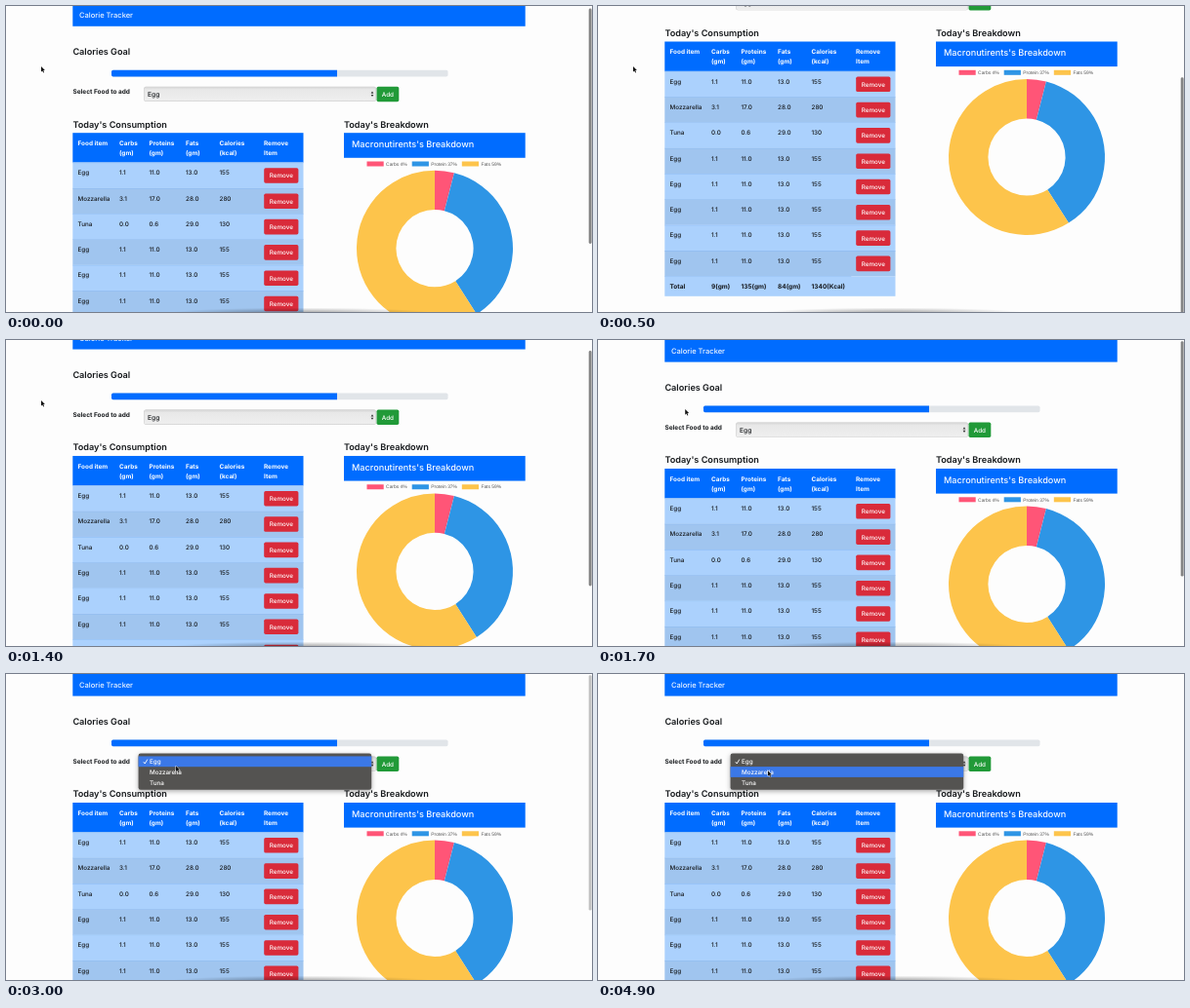
An HTML page with a canvas for the animation above (5000 ms loop, 600 px wide and 314 px high).

```html
<!DOCTYPE html>
<html lang="en">
<head>
<meta charset="utf-8">
<title>Calorie Tracker</title>
<style>
  html, body { margin: 0; width: 100%; height: 100%; overflow: hidden; background: #fdfdfd; }
  canvas { display: block; width: 600px; height: 314px; }
</style>
</head>
<body>
<canvas id="stage"></canvas>
<script>
const W = 600, H = 314, LOOP = 5000, STEP = 100, MAX_SCROLL = 95.5;
const BLUE = '#006cff', INK = '#16191c';
const canvas = document.getElementById('stage');
const ctx = canvas.getContext('2d');
const ratio = window.devicePixelRatio || 1;
canvas.width = W * ratio;
canvas.height = H * ratio;

const COLS = [73.5, 116, 146.5, 184, 218.5, 264];
const HEAD = [['Food item'], ['Carbs', '(gm)'], ['Proteins', '(gm)'],
  ['Fats', '(gm)'], ['Calories', '(kcal)'], ['Remove', 'Item']];
const EGG = ['Egg', '1.1', '11.0', '13.0', '155'];
const ROWS = [EGG, ['Mozzarella', '3.1', '17.0', '28.0', '280'],
  ['Tuna', '0.0', '0.6', '29.0', '130'], EGG, EGG, EGG, EGG, EGG];
const TOTAL = ['Total', '9(gm)', '135(gm)', '84(gm)', '1340(Kcal)'];
const SLICES = [
  { label: 'Carbs 4%', part: 0.04, color: '#ff5577', x: 369.5 },
  { label: 'Protein 37%', part: 0.37, color: '#2e95e5', x: 415.7 },
  { label: 'Fats 59%', part: 0.59, color: '#fdc44b', x: 466.8 }
];
const FOODS = ['Egg', 'Mozzarella', 'Tuna'];

const clamp = v => Math.max(0, Math.min(1, v));
const ramp = (t, a, b) => clamp((t - a) / (b - a));
const smooth = u => u * u * (3 - 2 * u);
const mix = (a, b, u) => a + (b - a) * u;

function rect(x, y, w, h, color) {
  ctx.fillStyle = color;
  ctx.fillRect(x, y, w, h);
}

function round(x, y, w, h, r, color) {
  ctx.beginPath();
  ctx.roundRect(x, y, w, h, r);
  ctx.fillStyle = color;
  ctx.fill();
}

function text(str, x, y, size, color = INK, weight = 500, align = 'left') {
  ctx.font = `${weight} ${size}px Inter, "Open Sans", sans-serif`;
  ctx.textRendering = 'geometricPrecision';
  ctx.textAlign = align;
  ctx.fillStyle = color;
  ctx.fillText(str, x, y);
}

const heading = (str, x, y) => text(str, x, y, 9.15, INK, 600);

function button(label, x, y, w, h, color) {
  round(x, y, w, h, 1.7, color);
  text(label, x + w / 2, y + h / 2 + 2.4, 6.3, '#fff', 500, 'center');
}

function triangle(x, y, dy) {
  ctx.beginPath();
  ctx.moveTo(x - 1.4, y);
  ctx.lineTo(x + 1.4, y);
  ctx.lineTo(x, y + dy);
  ctx.fillStyle = '#333';
  ctx.fill();
}

function drawForm() {
  rect(68.3, 0, 463.4, 22.6, BLUE);
  text('Calorie Tracker', 75, 13.8, 7.55, '#eef5ff');
  heading('Calories Goal', 68.4, 51.8);

  round(108, 67.6, 344.5, 6.7, 1.7, '#e1e5e9');
  round(108, 67.6, 231, 6.7, [1.7, 0, 0, 1.7], BLUE);

  text('Select Food to add', 68.4, 91.8, 6.5, INK, 700);
  const shade = ctx.createLinearGradient(0, 84.5, 0, 100);
  shade.addColorStop(0, '#d2d2d2');
  shade.addColorStop(0.2, '#e8e8e8');
  shade.addColorStop(1, '#efefef');
  round(141.3, 84.5, 237.5, 15.3, 1.7, '#c4c4c4');
  round(141.7, 84.9, 236.7, 14.5, 1.4, shade);
  text('Egg', 145, 94.8, 6.7);
  triangle(375, 91.5, -2.2);
  triangle(375, 92.7, 2.2);
  button('Add', 379.5, 84.5, 22.8, 15.5, '#219a38');
}

function drawTable() {
  const left = 68.3, width = 236.2, rowH = 26.3, top = 162.4;
  heading("Today's Consumption", 68.4, 126.4);
  rect(left, 132, width, top - 132, BLUE);
  HEAD.forEach((lines, c) => lines.forEach((line, i) =>
    text(line, COLS[c], 144.8 + i * 9.9, 6.4, '#fff', 700)));

  ROWS.forEach((cells, r) => {
    const y = top + r * rowH;
    rect(left, y, width, rowH, r % 2 ? '#a0c5ef' : '#abd1fd');
    rect(left, y, width, 0.5, '#84b6f2');
    cells.forEach((cell, c) => text(cell, COLS[c], y + 12.7, 6.3));
    button('Remove', 264.2, y + 5.6, 35.2, 15.6, '#d92b3a');
  });

  const y = top + ROWS.length * rowH;
  rect(left, y, width, 20.5, '#abd1fd');
  rect(left, y, 191, 0.5, '#84b6f2');
  TOTAL.forEach((cell, c) => text(cell, COLS[c], y + 12.7, 6.5, INK, 700));
}

function drawChart() {
  heading("Today's Breakdown", 346, 126.4);
  rect(346, 132, 185.7, 25.6, BLUE);
  text("Macronutirents's Breakdown", 354, 146.7, 9.15, '#f6faff');

  let from = -Math.PI / 2;
  for (const s of SLICES) {
    rect(s.x, 161.3, 17.2, 5, s.color);
    ctx.font = '4.9px "Liberation Sans", Arial, sans-serif';
    ctx.textAlign = 'left';
    ctx.fillStyle = '#555';
    ctx.fillText(s.label, s.x + 19.6, 165.5);

    const to = from + s.part * Math.PI * 2;
    ctx.beginPath();
    ctx.arc(439, 250.5, 80, from, to);
    ctx.arc(439, 250.5, 39.6, to, from, true);
    ctx.closePath();
    ctx.fillStyle = s.color;
    ctx.fill();
    from = to;
  }
}

function drawMenu(active) {
  ctx.save();
  ctx.shadowColor = 'rgba(0,0,0,.35)';
  ctx.shadowBlur = 5 * ratio;
  ctx.shadowOffsetY = 1.5 * ratio;
  round(135.6, 81.5, 238.6, 37.3, 2.2, '#545351');
  ctx.restore();
  rect(135.6, 84.4 + active * 10.7, 238.6, 10.8, '#3b78e7');
  FOODS.forEach((food, i) => text(food, 147, 92.2 + i * 10.7, 6.3, '#fff'));
  ctx.beginPath();
  ctx.moveTo(140.8, 90.2);
  ctx.lineTo(142.2, 92);
  ctx.lineTo(144.8, 87.6);
  ctx.strokeStyle = '#fff';
  ctx.lineWidth = 0.9;
  ctx.stroke();
}

function drawDockShadow() {
  ctx.save();
  ctx.translate(302, 315.5);
  ctx.scale(138, 6);
  const glow = ctx.createRadialGradient(0, 0, 0, 0, 0, 1);
  glow.addColorStop(0, 'rgba(0,0,0,.4)');
  glow.addColorStop(0.6, 'rgba(0,0,0,.16)');
  glow.addColorStop(1, 'rgba(0,0,0,0)');
  rect(-1, -1, 2, 2, glow);
  ctx.restore();
}

function drawCursor(x, y) {
  const shape = [[0, 0], [0, 5.6], [1.3, 4.4], [2.2, 6.5], [3.1, 6.1], [2.2, 4.1], [3.9, 4]];
  ctx.beginPath();
  shape.forEach(([dx, dy]) => ctx.lineTo(x + dx, y + dy));
  ctx.closePath();
  ctx.lineJoin = 'round';
  ctx.strokeStyle = '#fff';
  ctx.lineWidth = 0.8;
  ctx.stroke();
  ctx.fillStyle = '#111';
  ctx.fill();
}

function scrollAt(t) {
  return MAX_SCROLL * (smooth(ramp(t, -40, 450)) - smooth(ramp(t, 1165, 1471)));
}

function cursorAt(t) {
  const over = smooth(ramp(t, 1500, 1980));
  const down = smooth(ramp(t, 2500, 3000));
  const pick = ramp(t, 3000, 3200);
  return [mix(36, 177.5, over) - 3.5 * down, mix(62, 86, over) + 8.5 * down + 4.7 * pick];
}

function draw(t) {
  const scroll = scrollAt(t);
  ctx.setTransform(ratio, 0, 0, ratio, 0, 0);
  rect(0, 0, W, H, '#fdfdfd');

  ctx.save();
  ctx.translate(0, -scroll);
  drawForm();
  drawTable();
  drawChart();
  ctx.restore();

  if (t >= 2500) drawMenu(t >= 3100 ? 1 : 0);
  drawDockShadow();

  ctx.globalAlpha = 1 - ramp(t, 2850, 3150);
  round(596.7, 1.2 + scroll * 0.755, 2.9, 241.4, 1.4, '#858585');
  ctx.globalAlpha = 1;

  drawCursor(...cursorAt(t));
}

const start = performance.now();
function tick() {
  const t = (performance.now() - start) % LOOP;
  draw(Math.floor(t / STEP) * STEP);
  requestAnimationFrame(tick);
}
tick();
</script>
</body>
</html>
```
